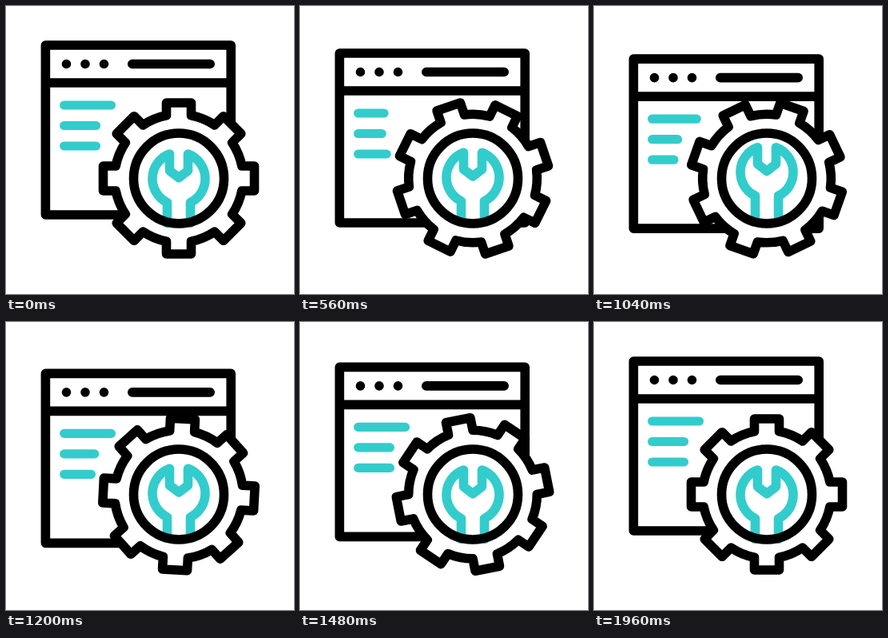
Write an HTML page that moves like this. It is 360 px wide and 360 px high and loops after 2000 ms.

```html
<!DOCTYPE html>
<html lang="en">
<head>
<meta charset="utf-8">
<title>Web settings icon</title>
<style>
  html, body { margin: 0; width: 100%; height: 100%; overflow: hidden; background: #fff; }
  svg { display: block; width: 100vw; height: 100vh; }
  .ink { stroke: #000; }
  .accent { stroke: #33cccc; }
</style>
</head>
<body>
<svg viewBox="0 0 360 360" fill="none" stroke-width="11.6" stroke-linecap="round" stroke-linejoin="round">
  <g id="page">
    <path class="ink" d="M49.4 49H281.2V261H49.4ZM49.4 96H281.2M157.8 72.5H255.2"/>
    <path class="ink" d="M75.5 72.5h0M99 72.5h0M122.5 72.5h0"/>
    <g id="lines" class="accent" stroke-width="11.2"></g>
  </g>
  <g transform="translate(216 215.5)">
    <path id="gear" class="ink" fill="#fff"/>
    <path id="wrench" class="accent" d="M-14.5 56V30.1A33 33 0 0 1 -11.5 -30.5V-9.7L0 -0.8L11.5 -9.7V-30.5A33 33 0 0 1 14.5 30.1V56"/>
    <circle class="ink" r="56.5"/>
  </g>
</svg>
<script>
const LOOP = 2000, STEP = 40, SPAN = 1960, TURN = 1840;
const $ = id => document.getElementById(id);
const clamp = v => Math.min(1, Math.max(0, v));

// Cubic Bezier easing with handles (x1, 0) and (x2, 1)
function ease(p, x1, x2) {
  let lo = 0, hi = 1, s = 0.5;
  for (let i = 0; i < 30; i++) {
    s = (lo + hi) / 2;
    const q = 1 - s;
    const x = 3 * q * q * s * x1 + 3 * q * s * s * x2 + s * s * s;
    if (x < p) lo = s; else hi = s;
  }
  return s * s * (3 - 2 * s);
}

// Rises from 0 to 1 at the middle, then mirrors back
const swing = (t, mid, half) => ease(clamp(1 - Math.abs(t - mid) / half), 0.5, 0.58);

function gearPath(teeth, body, tip, half) {
  const base = Math.sqrt(body * body - half * half);
  const points = [];
  for (let i = 0; i < teeth; i++) {
    const a = i * 2 * Math.PI / teeth, c = Math.cos(a), s = Math.sin(a);
    const at = (x, y) => `${(x * c - y * s).toFixed(2)} ${(x * s + y * c).toFixed(2)}`;
    points.push(`${at(-half, -base)}L${at(-half, -tip)}L${at(half, -tip)}L${at(half, -base)}`);
  }
  const arc = `A${body} ${body} 0 0 1 `;
  return `M${points.join(arc)}${arc}${points[0].split("L")[0]}Z`;
}
$("gear").setAttribute("d", gearPath(8, 80.3, 94.5, 15.5));

const lines = [
  { y: 124, end: 131.5, shrink: 27, mid: 620 },
  { y: 149.5, end: 112.5, shrink: 15, mid: 775 },
  { y: 175, end: 112.5, shrink: 14.5, mid: 900 }
];
for (const line of lines) {
  line.el = document.createElementNS("http://www.w3.org/2000/svg", "path");
  $("lines").append(line.el);
}

function draw(now) {
  const t = Math.floor(now % LOOP / STEP) * STEP;
  const lift = (id, y) => $(id).setAttribute("transform", `translate(0 ${y})`);
  lift("page", 17.3 * swing(t, SPAN / 2, SPAN / 2));
  lift("wrench", -11.5 * swing(t, 880, 460));
  $("gear").setAttribute("transform", `rotate(${180 * ease(clamp(t / TURN), 0.54, 0.495)})`);
  for (const { el, y, end, shrink, mid } of lines)
    el.setAttribute("d", `M72.7 ${y}H${end - shrink * swing(t, mid, 580)}`);
}

const start = performance.now();
function tick() {
  draw(performance.now() - start);
  requestAnimationFrame(tick);
}
tick();
</script>
</body>
</html>
```
